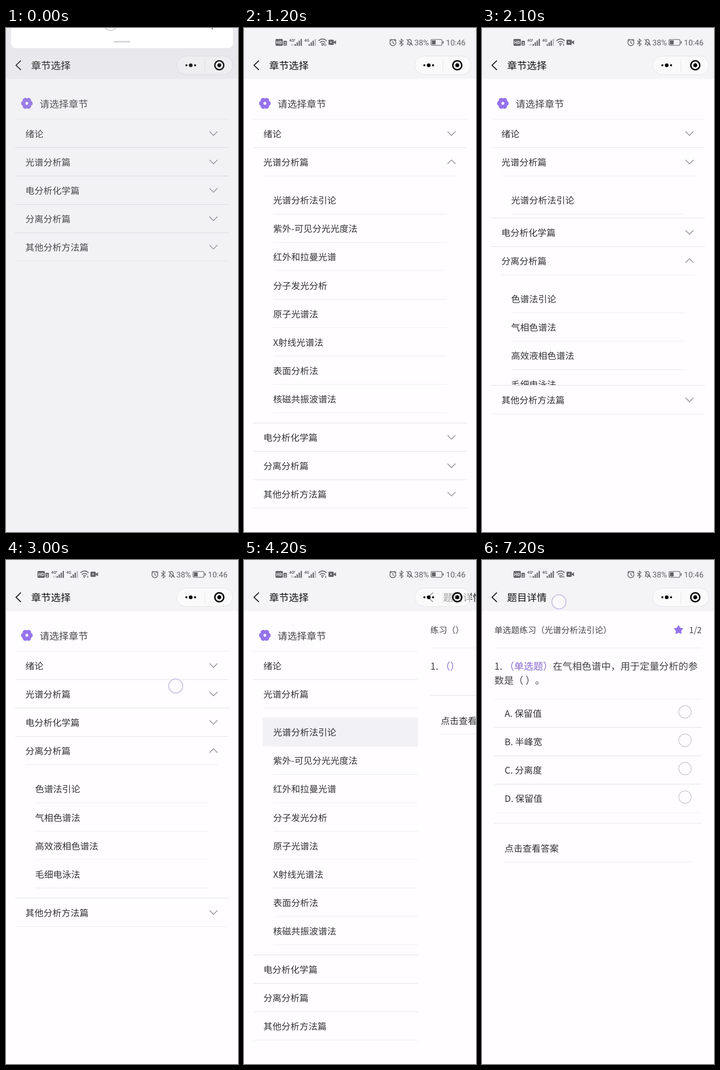
Write an HTML page that moves like this. It is 508x1102 px and loops after 7.3 s.

```html
<!DOCTYPE html>
<html lang="zh-CN">
<head>
<meta charset="utf-8">
<title>章节选择</title>
<style>
html, body { margin: 0; width: 100%; height: 100%; overflow: hidden; background: #fffdff; }
#stage { display: block; width: 100%; height: 100%; }
text {
  font-family: "Noto Sans CJK SC", "Noto Sans CJK", "Noto Sans CJK JP", sans-serif;
  white-space: pre; text-spacing-trim: space-all; text-rendering: geometricPrecision;
}
.sys, .sys text { font-family: Roboto, sans-serif; }
</style>
</head>
<body>
<svg id="stage" viewBox="0 0 508 1102" lang="zh-CN"></svg>
<script>
const stage = document.getElementById('stage');
const LOOP = 7300, STEP = 100, ROW = 62.1, TOP = 199.4;
const BODY = 19.76, LARGE = 21.17, SMALL = 18.34;
const PAPER = '#fffdff', BAR = '#f4f3f6', PURPLE = '#9673ec', INK = '#333236';
const GREY = '#646367';

const chapters = [
  { name: '绪论', items: [] },
  { name: '光谱分析篇', items: ['光谱分析法引论', '紫外-可见分光光度法', '红外和拉曼光谱',
    '分子发光分析', '原子光谱法', 'X射线光谱法', '表面分析法', '核磁共振波谱法'] },
  { name: '电分析化学篇', items: [] },
  { name: '分离分析篇', items: ['色谱法引论', '气相色谱法', '高效液相色谱法', '毛细电泳法'] },
  { name: '其他分析方法篇', items: [] }
];
const options = ['A. 保留值', 'B. 半峰宽', 'C. 分离度', 'D. 保留值'];
const taps = [[700, 341, 316], [1700, 366, 950], [3000, 371.5, 275.5], [3980, 330, 374], [7200, 168.5, 91.5]];

const clamp = v => Math.max(0, Math.min(1, v));
const smooth = v => v * v * (3 - 2 * v);

// cy is the middle of the glyphs
const label = (x, cy, size, s, fill = INK) =>
  `<text x="${x}" y="${cy + size * 0.38}" font-size="${size}" fill="${fill}">${s}</text>`;
const rule = (x1, x2, y, strong) =>
  `<path d="M${x1} ${y}H${x2}" stroke="${strong ? '#e8e7ed' : '#efeef2'}" stroke-width="${strong ? 1.6 : 1.4}"/>`;
const rect = (x, y, w, h, fill, rx = 0) =>
  `<rect x="${x}" y="${y}" width="${w}" height="${h}" rx="${rx}" fill="${fill}"/>`;
const disc = (x, y, r, fill) => `<circle cx="${x}" cy="${y}" r="${r}" fill="${fill}"/>`;
const ring = (x, y, r, stroke, w, fill = 'none') =>
  `<circle cx="${x}" cy="${y}" r="${r}" fill="${fill}" stroke="${stroke}" stroke-width="${w}"/>`;
const line = (d, stroke, w) =>
  `<path d="${d}" fill="none" stroke="${stroke}" stroke-width="${w}"/>`;

function polar(n, fn) {
  return Array.from({ length: n }, (_, i) => fn(i * 2 * Math.PI / n, i)).join('');
}

function flower(x, y) {
  return polar(6, a => disc(x + 7.1 * Math.cos(a), y + 7.3 * Math.sin(a), 5.7, PURPLE)) +
    disc(x, y, 9, PURPLE) + disc(x, y, 3.1, PAPER);
}

function star(x, y) {
  const pts = polar(10, (a, i) => {
    const r = i % 2 ? 5.4 : 9.6;
    return `${x + r * Math.sin(a)},${y - r * Math.cos(a)} `;
  });
  return `<polygon points="${pts}" fill="${PURPLE}" stroke="${PURPLE}" stroke-width="1.4" stroke-linejoin="round"/>`;
}

function navBar(title) {
  return rect(0, 0, 508, 111.5, BAR) + line('M32.6 71.2L21.9 81.5L32.6 91.8', '#111', 2) +
    label(55.1, 81.8, 21.6, title, '#111');
}

function capsule() {
  return `<rect x="374" y="61.5" width="122.5" height="40" rx="20" fill="#fff" fill-opacity=".6" stroke="#e2e1e5"/>` +
    line('M435.5 68V95', '#e2e1e5', 1) +
    disc(395, 81.5, 2.2, '#000') + disc(404.5, 81.5, 4.1, '#000') + disc(414, 81.5, 2.2, '#000') +
    ring(467, 81.5, 9.8, '#000', 3) + disc(467, 81.5, 4.4, '#000');
}

function bars(x, lastFill) {
  return [0, 1, 2, 3].map(i =>
    rect(x + i * 4.4, 35 - i * 3.7, 2.7, 4 + i * 3.7, i === 3 ? lastFill : GREY)).join('');
}

function statusBar(t) {
  const small = (x, y, size, s, fill = GREY) =>
    `<text x="${x}" y="${y}" font-size="${size}" font-weight="700" fill="${fill}">${s}</text>`;
  const big = (x, s) => `<text x="${x}" y="38" font-size="17.2" fill="${GREY}">${s}</text>`;
  const busy = t < 1500 || t >= 4500;
  return `<g class="sys" opacity="${clamp((t - 200) / 200)}">` +
    rect(69, 24, 16, 15, GREY, 2) + small(70.6, 35.4, 9.6, 'HD', BAR) +
    rect(86.5, 28, 7.5, 10.5, GREY, 1.5) + small(88, 36.6, 8.5, '2', BAR) +
    small(99, 30, 8.5, '4G') + small(108.8, 27.5, 6.5, '+') +
    line('M104.5 39V34.5M107.5 34.5V39', '#aaa9ad', 1.2) + bars(110.8, GREY) +
    small(132, 30, 8.5, '4G') + bars(141.5, t < 6300 ? '#b5b4b8' : GREY) +
    line('M163 28Q172 20 181 28M166 32Q172 26.5 178 32M169 35.5Q172 32.5 175 35.5', GREY, 1.9) +
    disc(171.5, 37.5, 1.5, GREY) +
    (busy ? line('M175.5 39V34', GREY, 1.6) : '') + line('M179 34.5V39', GREY, 1.6) +
    rect(185, 25.5, 11.5, 11.5, GREY, 2) +
    `<path d="M196 30.5L201.5 27V35.5L196 32Z" fill="${GREY}"/>` + disc(190.5, 31, 1.6, BAR) +
    ring(326, 32, 6.6, GREY, 1.6) +
    line('M326 28V32.5L329 34M318.5 27.5L322.5 24M329.5 24L333.5 27.5', GREY, 1.5) +
    line('M340 27.5L348.5 35.5L344.3 39V24L348.5 27.5L340 35.5', GREY, 1.4) +
    line('M357.5 35.5H367.5L366 33V29.5Q366 25 362.5 25Q359 25 359 29.5V33ZM361 38H364M356 24.5L369.5 38.5', GREY, 1.5) +
    big(373, '38%') +
    `<rect x="409.5" y="25.2" width="24" height="12.6" rx="2.5" fill="none" stroke="${GREY}" stroke-width="1.3"/>` +
    rect(411.3, 27, 8.4, 9, GREY) + rect(435, 28.5, 2, 6, GREY, 1) + big(442.3, '10:46') + '</g>';
}

const unfold = (t, tap) => smooth(clamp((t - tap - 127) / 370));
const turn = (t, tap) => clamp((t - tap - 48) / 200);

// spectral chapter opens, gives way to separation, then opens again
function sections(t, move) {
  const [a, b, c] = [700, 1700, 3000].map(tap => move(t, tap));
  return [0, a - b + c, 0, b - c, 0];
}

function chapterPage(t) {
  const open = sections(t, unfold), spin = sections(t, turn);
  let s = rect(0, 0, 508, 1102, PAPER) + navBar('章节选择') + flower(45.7, 164.7) +
    label(73.8, 166.4, LARGE, '请选择章节', '#454448') + rule(20, 488, TOP);
  let y = TOP;
  chapters.forEach((ch, i) => {
    s += label(42.6, y + 31.6, BODY, ch.name);
    s += `<g transform="translate(454.3 ${y + 31.2}) rotate(${-180 * spin[i]})">` +
      line('M-8.7 -4.4L0 4.3L8.7 -4.4', '#96959b', 1.8) + '</g>';
    y += ROW;
    const h = (ch.items.length * ROW + 43.2) * open[i];
    if (h > 0) {
      s += rule(42, 466, y);
      s += `<svg x="0" y="${y}" width="508" height="${h}">`;
      ch.items.forEach((name, k) => {
        const top = 22 + k * ROW;
        if (t >= 4100 && i === 1 && k === 0) s += rect(41, top - 0.7, 426, ROW, '#f2f1f5');
        s += label(63.8, top + 31.1, BODY, name) + rule(64, 444, top + ROW - 1);
      });
      s += '</svg>';
      y += h;
    }
    s += rule(20, 488, y, i < 4);
  });
  return s;
}

function quizPage(loaded) {
  const violet = '#8a6cd0', soft = '#454448';
  const kind = loaded ? '单选题' : '', topic = loaded ? '光谱分析法引论' : '';
  let s = rect(0, 0, 508, 1102, PAPER) + navBar('题目详情') +
    label(27, 152.8, SMALL, `${kind}练习（${topic}）`, soft) + rule(27, 481, 192.2) +
    label(27, 231.9, LARGE, '1.', soft) + label(49.2, 231.9, LARGE, `（${kind}）`, violet);
  if (loaded) {
    s += star(430.3, 153) + label(453.5, 152.8, SMALL, '1/2', soft) +
      label(155.1, 231.9, LARGE, '在气相色谱中，用于定量分析的参', soft) +
      label(27, 262.9, LARGE, '数是（ ）。', soft) + rule(27, 481, 304.3);
    options.forEach((o, i) => {
      const y = 304 + i * ROW;
      s += label(49.6, y + 31.3, BODY, o) + ring(444.5, y + 28, 13.6, '#c6c4cb', 1.5) +
        rule(27, 481, y + ROW, i < 3);
    });
  }
  const end = loaded ? 575.5 : 296;
  return s + rule(27, 481, end, true) + label(49.6, end + 55, BODY, '点击查看答案') +
    rule(50, 459, end + 84.8);
}

function shade() {
  return rect(11, -30, 486, 74, '#fff', 11) + rect(235.5, 28.5, 36.5, 3, '#cfced2', 1.5) +
    ring(229, -11, 16, '#c4c3c7', 1.6, '#fff') +
    line('M55 0L57 -2', '#777', 1.5) + line('M451.5 -3V3', '#555', 1.8);
}

function touches(t) {
  return taps.map(([at, x, y]) => {
    const a = t < at ? 0 : clamp(1 - (t - at) / 212);
    return a ? `<g opacity="${a}">${ring(x, y, 15.4, '#cbc5e3', 2.2, 'rgba(255,253,255,.6)')}</g>` : '';
  }).join('');
}

function draw(t) {
  let s = t < 4700 ? chapterPage(t) : '';
  if (t > 4163) {
    const left = 508 * Math.pow(1 - clamp((t - 4163) / 405), 3);
    s += `<g transform="translate(${left} 0)">${quizPage(t >= 4600)}</g>`;
  }
  s += capsule() + statusBar(t);
  const dim = t < 100 ? 1 : 0.4 * clamp((400 - t) / 300);
  if (dim) s += `<g opacity="${0.17 * dim}">${rect(0, 0, 508, 1102, '#b2b0b8')}</g>`;
  if (t < 100) s += shade();
  stage.innerHTML = s + touches(t);
}

let start, shown = -1;
function tick(now) {
  start ??= now;
  const t = Math.floor(((now - start + 1) % LOOP) / STEP) * STEP;
  if (t !== shown) draw(shown = t);
  requestAnimationFrame(tick);
}
draw(0);
requestAnimationFrame(tick);
</script>
</body>
</html>
```
